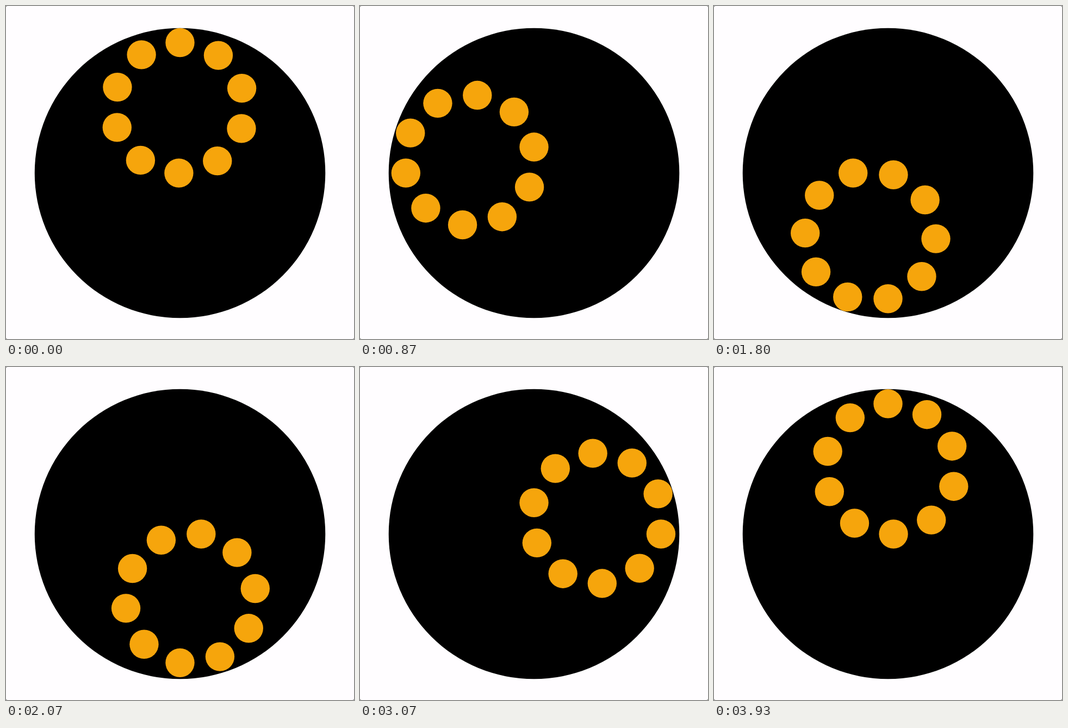
Animation, 640 px wide and 614 px high, one loop 3990 ms. Source, as an HTML page with a canvas:

```html
<!DOCTYPE html>
<html lang="en">
<head>
<meta charset="utf-8">
<title>Rolling ring</title>
<style>
  html, body { margin: 0; width: 100%; height: 100%; overflow: hidden; }
  canvas { display: block; }
</style>
</head>
<body>
<canvas id="stage" width="640" height="614"></canvas>
<script>
const ctx = document.getElementById('stage').getContext('2d');
const LOOP = 3990, CX = 320, CY = 308;
const REACH = 240.5, DOTS = 10;

// The roll is slightly uneven: [step, degrees anticlockwise from the top]
const ROLL = [
  [0, 0.5], [8, 52.9], [13, 78.5], [16, 99.2], [22, 135.5],
  [24, 145.9], [31, 189.3], [32, 193.6], [39, 239], [40, 247.5],
  [46, 283.9], [48, 294.7], [56, 342.8], [59, 357.6], [60, 360.5]
];

// Motion advances 15 times a second, on 10 ms boundaries
const stepAt = ms => Math.floor((Math.floor(ms / 10) + 0.4) * 0.15);

function rollAt(step) {
  const i = ROLL.findIndex(([s]) => s > step);
  const [s0, a0] = ROLL[i - 1], [s1, a1] = ROLL[i];
  return (a0 + (a1 - a0) * (step - s0) / (s1 - s0)) * Math.PI / 180;
}

function disc(x, y, r, color) {
  ctx.fillStyle = color;
  ctx.beginPath();
  ctx.arc(x, y, r, 0, 2 * Math.PI);
  ctx.fill();
}

function draw() {
  const roll = rollAt(stepAt(performance.now() % LOOP));

  // Pale card with tiny rounded corners
  ctx.fillStyle = '#777';
  ctx.fillRect(0, 0, 640, 614);
  ctx.fillStyle = '#fffdff';
  ctx.beginPath();
  ctx.roundRect(0, 0, 640, 614, 3);
  ctx.fill();

  disc(CX, CY, 267.3, '#000');

  // Each dot slides along its own diameter; together they form a rolling ring
  for (let i = 0; i < DOTS; i++) {
    const angle = i * Math.PI / DOTS;
    const slide = REACH * Math.cos(roll - angle);
    disc(CX - slide * Math.sin(angle), CY - slide * Math.cos(angle), 26.7, '#f6a50c');
  }
  requestAnimationFrame(draw);
}
draw();
</script>
</body>
</html>
```
